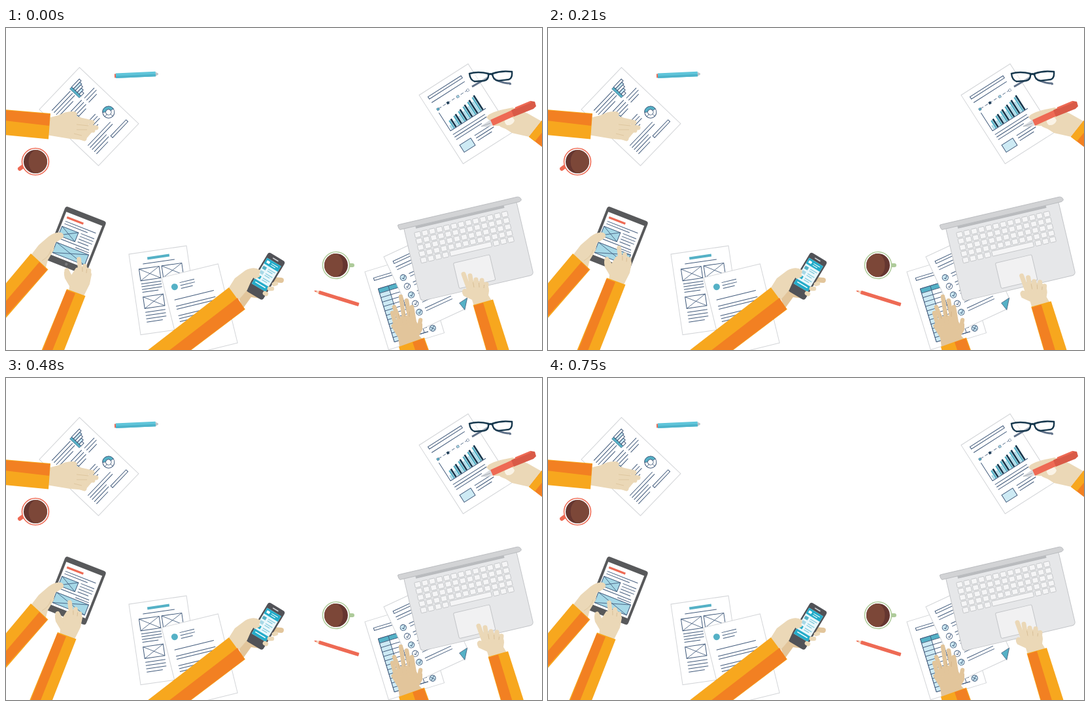
Animation of 820 by 494 pixels, one loop 0.85 s. Source, as an HTML page:

```html
<!DOCTYPE html>
<html lang="en">
<head>
<meta charset="utf-8">
<title>Desk work</title>
<style>
html, body { margin: 0; width: 100%; height: 100%; overflow: hidden; background: #fff }
svg { display: block }
</style>
</head>
<body>
<svg id="desk" width="820" height="494" viewBox="0 0 820 494"></svg>
<script>
const LIGHT = '#f7a71e', DARK = '#f28022', SKIN = '#ebd8b7', SHADE = '#e2c59b', RED = '#ee6a54',
  NAVY = '#425b7c', TEAL = '#55b1c6', SKY = '#a6d8e7', PALE = '#cdeaf4', INK = '#16374d';

const shape = (d, fill, extra = '') => `<path d="${d}" fill="${fill}" ${extra}/>`;
const poly = (points, fill, extra = '') => `<polygon points="${points}" fill="${fill}" ${extra}/>`;
const stroke = (d, color = NAVY, width = 1) =>
  `<path d="${d}" fill="none" stroke="${color}" stroke-width="${width}" stroke-linejoin="round"/>`;
const fingers = (d, color = SKIN, width = 7) =>
  `<path d="${d}" fill="none" stroke="${color}" stroke-width="${width}" stroke-linecap="round" stroke-linejoin="round"/>`;
const rect = (x, y, w, h, fill, extra = '') =>
  `<rect x="${x}" y="${y}" width="${w}" height="${h}" fill="${fill}" ${extra}/>`;
const box = (x, y, w, h, fill = 'none') => rect(x, y, w, h, fill, `stroke="${NAVY}"`);
const disc = (x, y, r, fill, extra = '') => `<circle cx="${x}" cy="${y}" r="${r}" fill="${fill}" ${extra}/>`;
const repeat = (n, draw) => Array.from({ length: n }, (_, i) => draw(i)).join('');
const lines = (x, y, w, n = 1, gap = 4.6) => stroke(repeat(n, i => `M${x} ${y + i * gap}h${i === n - 1 && n > 2 ? w * .8 : w}`));
const picture = (x, y, w, h, fill) => box(x, y, w, h, fill) + stroke(`M${x} ${y}l${w} ${h}m0 ${-h}l${-w} ${h}`, NAVY, .8);
const place = (x, y, angle, content) => `<g transform="translate(${x} ${y}) rotate(${angle})">${content}</g>`;
const paper = (x, y, angle, content) =>
  place(x, y, angle, rect(0, 0, 89, 125, '#fff', 'stroke="#d3d5d8"') + content);

const cup = (x, y, rim, handle, shift) =>
  fingers(handle, rim, 6) + disc(x, y, 20.5, '#fff', `stroke="${rim}" stroke-width="1.6"`) +
  disc(x, y, 18, '#653630') +
  shape(`M${x} ${y - 18}a18 18 0 0 ${shift > 0 ? 1 : 0} 0 36q${-shift * 1.3} -5 ${-shift * 1.3} -18t${shift * 1.3} -18`, '#7c4738');

const report = paper(51, 125, -46.4,
  lines(12, 15, 41, 4) + lines(31, 37, 24, 4) + disc(26, 50, 8, PALE, `stroke="${NAVY}"`) +
  rect(55, 12, 4, 20, TEAL, `stroke="${NAVY}" stroke-width=".6"`) +
  repeat(5, i => box(59, 12 + i * 4, [17, 14, 12, 9, 6][i], 4, i % 2 ? PALE : '#fff')) +
  lines(60, 38, 22, 3) +
  disc(70, 79.5, 9, '#fff', `stroke="${NAVY}"`) +
  shape('M63.5 73.2a9 9 0 0 1 15.3 8l-5-1a4 4 0 0 0-6.5-4z', TEAL, `stroke="${NAVY}" stroke-width=".8"`) +
  disc(70, 79.5, 4.2, '#fff', `stroke="${NAVY}"`) + stroke('M70 84v5M61 80h5', NAVY, .8) +
  lines(12, 67, 42, 4) + lines(11, 92, 50, 2) + lines(11, 101, 32, 3) + box(46, 107, 34, 4));

const leftArm =
  shape('M60 139L80 134Q92 127 104 128Q111 130 108 135Q118 138 125 146L133 158L121 172L98 170L80 167L62 164Z', SKIN) +
  fingers('M105 139L132 145M110 149L138 153M106 156L133 157M96 162L120 170') +
  stroke('M108 148L126 150M108 156L124 156M104 162L116 165', '#d9bf96', .7) +
  poly('-2,125 68,131 65,170.500 -2,164', LIGHT) + poly('-2,126 67.500,132 66,150 -2,142', DARK);

const bluePen = place(166, 73.5, -2.6,
  rect(0, -3, 3, 6, RED) + rect(2, -4, 61, 7.500, '#5fc5da') + rect(2, 0, 61, 3.500, '#4eb3ca') + poly('63,-3 67,-1 67,1 63,3', '#bfc4c9'));

const chart = paper(632, 103, -32.6,
  box(10, 9.5, 60, 4) + lines(10, 20, 60) +
  stroke('M14 33.500H66', NAVY, .8).replace('/>', ' stroke-dasharray="5 3"/>') +
  repeat(4, i => rect(11 + i * 18, 32, 3.5, 3.5, [TEAL, INK, SKY, '#fff'][i], `stroke="${NAVY}" stroke-width=".5"`)) +
  stroke('M11 39V72H75') +
  repeat(18, i => {
    const h = 7 + 7 * Math.abs(Math.sin(i * 2.1)) + i * .75;
    return rect(13.5 + i * 3.25, 71.5 - h, 2.6, h, [SKY, TEAL, INK][i % 3]);
  }) +
  lines(11, 79, 58, 3) + box(11, 98, 20, 13, PALE) + lines(38, 98, 32, 3));

const glasses =
  stroke('M737 76L713 90M746 77Q758 85 771 85L772 87', '#607189', 3) +
  shape('M709 70Q722 66 738 70Q739 80 731 81L717 82Q710 80 709 70ZM744 70Q758 65 774 67Q775 77 769 79L753 81Q745 80 744 70Z',
    'rgba(255,255,255,.45)', `stroke="${INK}" stroke-width="2.400"`) +
  stroke('M737 72Q741 69 745 72', INK, 3);

const penArm =
  shape('M735 137Q738 131 756 126L775 122L798 131L821 144L805 168L774 161L757 150L747 150Z', SKIN) +
  shape('M764 139Q775 133 778 142Q775 150 766 149Q761 145 764 139Z', '#faf3e6') +
  poly('726,151 742,140 745,149 736,152', '#d8dce0') + stroke('M727 151L741 146', '#989fa7', .8) +
  poly('741,141 774,126 778,135 745,150', RED) +
  poly('773,126 803,112 809,113 811,120 807,124 777,136', '#d95a47') + stroke('M779 123L803 113', RED, 2.5) +
  fingers('M741 135L758 129M758 149L768 153', SKIN, 6) +
  poly('822,139 800,167 822,184', DARK) + poly('822,139 800,167 809,174 822,158', LIGHT);

const tablet = place(91.5, 273, 21.5,
  rect(0, 0, 67, 88, '#58595b', 'rx="4"') + rect(4, 8, 59, 70, '#fff') +
  disc(33.5, 83, 2.2, '#77787b') +
  rect(8, 14, 27, 3.2, RED) + lines(8, 22, 50) + lines(8, 26, 38) +
  picture(6, 31, 27, 15, SKY) + lines(37, 31, 22, 4, 4.5) +
  lines(8, 50, 50) + lines(37, 54, 22) + picture(7, 57, 53, 17, SKY));

const tabletArm =
  shape('M37 350L50 333L65 320Q76 312 85 314Q90 317 87 322L75 330L73 341L64 356L60 371Z', SKIN) +
  stroke('M69 340Q66 351 55 357', '#d9bf96', .7) +
  poly('38,346 64.500,370.500 -2,447 -2,394', LIGHT) + poly('51,359 63,371 -2,444 -2,421', DARK);

const tapHand =
  shape('M96 405L97 396L90 384Q87 372 92 370L100 379L107 368L119 365Q130 368 131 378L128 393L118 413Z', SKIN) +
  fingers('M93 372L99 384') + fingers('M111.500 354.500L114 375M120.500 365L120 376M127 372L126 382', SKIN, 6.6) +
  stroke('M116.800 367L117 374M123.500 370L123 376', '#d3b88e', .8) +
  poly('93,400.500 121.500,411 79,520 44,520', LIGHT) + poly('92.500,402 106,407 61,520 46,520', DARK);

const layout = paper(188, 347, -8.3,
  rect(27, 8.5, 34, 4, TEAL) + lines(19, 18, 49) +
  picture(12, 25, 31, 18, '#fff') + picture(47, 25, 31, 18, '#fff') +
  lines(12, 48, 31, 4, 4.3) + lines(47, 48, 31, 4, 4.3) +
  picture(12, 68, 31, 18, '#fff') + lines(12, 92, 31, 4, 5));

const letter = paper(238, 383, -13.8,
  disc(16, 18.5, 5, TEAL) + lines(25, 14, 23, 3) +
  lines(11, 38, 62) + lines(11, 48, 62, 2) + lines(11, 63, 62, 3));

const phone = place(402, 343.5, 31,
  rect(0, 0, 30, 69, '#515257', 'rx="4"') + rect(10, 4, 10, 1.6, '#d7dadc', 'rx=".8"') +
  rect(2.5, 9, 25, 46, '#e9f7fb') + rect(2.5, 9, 25, 10, '#24acca') +
  rect(5, 12, 5, 4, '#fff') + stroke('M13 13h11M13 16h8', '#fff', 1) +
  repeat(3, i => rect(4, 22 + i * 8, 6, 5, [TEAL, SKY, '#24acca'][i]) +
    stroke(`M13 ${23 + i * 8}h12m-12 3h9`, '#7fc9dc', 1.2)) +
  rect(2.5, 46, 25, 9, '#24acca') + stroke('M6 50h18', '#fff', 1.5));

const phoneBack = shape('M352 402L374 384L396 410L390 415L375 413L362 431Z', SHADE) + fingers('M408 386L421 387', SHADE, 8);
const phoneArm =
  shape('M340 400L350 384L366 372Q379 365 388 371Q391 376 384 380L377 384L369 402L356 417Z', SKIN) +
  fingers('M410 393L413 392M403 400L407 400M396 407L398 408', SKIN, 6.5) + fingers('M381 382L386 380', SKIN, 5) +
  poly('341,398 366,431.500 273,502 207,502', LIGHT) + poly('354,414 365,431.500 273,501 240,502', DARK);

const redPencil = place(471, 403, 17.3,
  poly('0,0 9,-2.800 9,2.800', '#f3d4bd') + poly('0,0 4,-1.400 4,1.400', RED) + rect(8, -2.8, 64, 5.6, RED, 'rx="1"'));

const table = paper(549, 374, -16.9,
  box(10, 13, 60, 4) + box(12, 31, 63, 85, '#fff') + rect(12, 31, 63, 7, TEAL) + rect(12, 38, 16, 78, PALE) +
  stroke(repeat(11, i => `M12 ${38 + i * 7.1}h63`) + 'M12 31v85h63V31zM28 31v85M44 31v85M60 31v85', NAVY, .9) +
  rect(66, 105, 16, 16, '#fff') + disc(74, 113, 4.6, PALE, `stroke="${NAVY}"`) + stroke('M71 110l6 6m0-6l-6 6'));

const checklist = place(578, 351, -24.9,
  poly('0,0 89,0 89,112 78,125 0,125', '#fff', 'stroke="#d3d5d8"') +
  poly('75,113 89,111 78,126', TEAL, `stroke="${NAVY}" stroke-width=".7"`) +
  box(10, 12, 60, 4) + lines(10, 22, 60, 2) +
  repeat(5, i => {
    const y = 41.5 + i * 14.6;
    return disc(13.5, y, 4.6, i % 2 ? '#fff' : PALE, `stroke="${NAVY}"`) +
      stroke(`M11.500 ${y}l2 2 3-4`) + lines(24, y - 2, 44, 2);
  }));

const key = (x, y, w = 9) => rect(x, y, w, 8, '#f5f5f6', 'stroke="#bfc1c4" stroke-width=".8" rx=".8"');
const laptop = place(609, 309, -13.2,
  rect(0, -4, 177, 117, '#e6e7e9', 'rx="5" stroke="#c3c5c8"') +
  shape('M-8 -8Q-8 -9 -6 -9H180Q185 -8 185 -3L182 -1H-6Q-8 -2 -8 -8Z', '#d2d3d5', 'stroke="#b5b7ba" stroke-width=".8"') +
  rect(18, -1, 139, 4, '#b9bbbe') +
  repeat(4, row => repeat(13, i => key(14 + i * 11.4, 8.5 + row * 10))) +
  repeat(4, i => key(14 + i * 11.4, 48.5)) + key(60, 48.5, 65) + repeat(3, i => key(128 + i * 11.4, 48.5)) +
  rect(61.5, 67.5, 57, 40, '#f1f1f2', 'rx="2" stroke="#c3c5c8"'));

const restingHand =
  shape('M602 490L600 475L589 457L596 448L608 440L624 444L632 457L637 453L637 463L632 472L639 479Z', SHADE) +
  fingers('M597 459L591 437M604 454L594 428M610 452L604 412M619 454L613 418M626 458L621 428M631 465L634 448', SHADE, 6.4) +
  stroke('M602 446L600 438M610 443L609 434M617 443L617 435', '#cdac7f', .7) +
  poly('601,489 640,475 649,500 604,500', LIGHT) + poly('622,482 639,476 648,500 628,500', DARK);

const padHand =
  shape('M716 427L713 417L700 411Q695 403 701 400L707 401L709 387L731 389Q739 394 739 403L738 410L744 420Z', SKIN) +
  fingers('M700 377.500L708 400M710 380L713 398M719 386L721 400M728 387L728 400M735 393L734 402', SKIN, 7) +
  stroke('M714.500 390L716 398M723.500 391L724 398M731.500 394L731 399', '#d3b88e', .8) +
  poly('714.500,425 745,416.500 778,520 742,520', LIGHT) + poly('715.500,426 730,421.500 760,520 743,520', DARK);

desk.innerHTML = [
  report, leftArm, cup(45, 205, RED, 'M25 213L21 216', 8), bluePen,
  chart, glasses, penArm,
  tablet, tabletArm, `<g id="tap">${tapHand}</g>`,
  layout, letter, phoneBack, phone, phoneArm,
  cup(505, 364, '#aecb9a', 'M526 364H530', -8), redPencil,
  table, checklist, laptop, restingHand, `<g id="pad">${padHand}</g>`
].join('');

// Keys are [time, x, y]
const tapPath = [[0, 0, 0], [60, -1, -3.5], [150, -2, -11], [240, -3.5, -20.5], [270, -4, -19], [390, -10, -14], [570, -18, -7], [750, -18, -10]];
const padPath = [[0, 0, 0], [150, 18, 2], [240, 28, 3], [390, 25, 3], [570, 21, 2.5], [750, 18, -2.5]];

function move(node, path, time) {
  const i = Math.max(1, path.findIndex(key => key[0] >= time));
  const [t0, x0, y0] = path[i - 1], [t1, x1, y1] = path[i];
  const k = (time - t0) / (t1 - t0);
  node.setAttribute('transform', `translate(${x0 + (x1 - x0) * k} ${y0 + (y1 - y0) * k})`);
}

const tap = document.getElementById('tap'), pad = document.getElementById('pad');
function frame() {
  const time = Math.min(750, Math.floor(performance.now() % 850 / 30) * 30);
  move(tap, tapPath, time);
  move(pad, padPath, time);
  requestAnimationFrame(frame);
}
frame();
</script>
</body>
</html>
```
